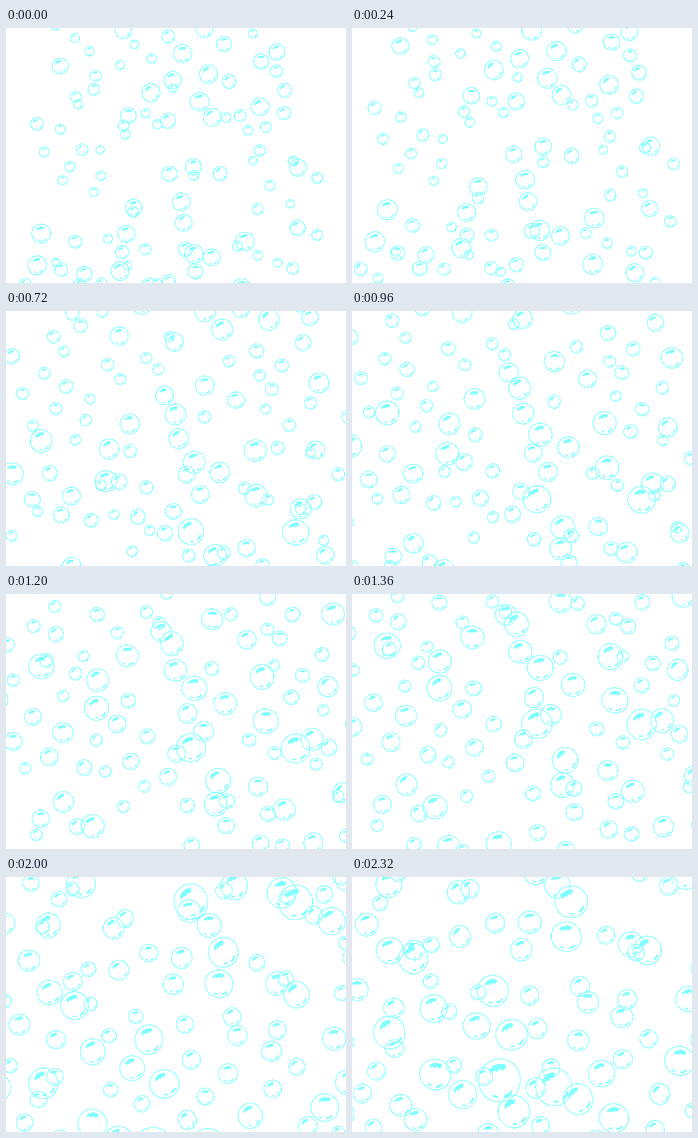
Write an HTML page that moves like this. It is 500x375 px and loops after 2400 ms.

```html
<!DOCTYPE html>
<html lang="en">
<head>
<meta charset="utf-8">
<title>Rising bubbles</title>
<style>
html, body { margin: 0; width: 100%; height: 100%; overflow: hidden; background: #fff; }
svg { display: block; width: 100vw; height: 100vh; }
.rim { fill: none; stroke: #80ffff; stroke-width: 1.2; vector-effect: non-scaling-stroke; }
.shine { fill: #80ffff; }
</style>
</head>
<body>
<svg id="stage" viewBox="0 0 500 375" shape-rendering="crispEdges"></svg>
<script>
const WIDTH = 500, HEIGHT = 375;
const LOOP = 2400, STEP = 80;
const ANCHOR = 1360;    // moment, in ms, that the bubble positions describe
const GROWTH = 0.00023; // relative growth per ms
const RISE = 0.0102;    // rise per ms, in radii
const SPREAD = 0.0002;  // outward drift per ms, relative to the middle
const COUNT = 160;
const GOLDEN = 0.618034;

const scaleAt = time => Math.exp(GROWTH * (time - ANCHOR));
const travelAt = time => RISE * (scaleAt(time) - 1) / GROWTH; // in radii

let seed = 41;
const random = () => (seed = seed * 16807 % 2147483647) / 2147483647;
const between = (low, high) => low + (high - low) * random();

// The largest bubbles rise almost straight up: x, y, radius
const leaders = [
  [217, 573, 25], [297, 550, 22], [55, 437, 19],
  [272, 191, 22], [426, 192, 22], [52, 76, 19]
].map(([x, y, r]) => ({ x, y, r, drift: 0 }));

// Spread evenly over every height that comes into view during the loop
function follower(_, i) {
  const r = 8.5 + 10.5 * random() ** 1.25;
  const top = r * travelAt(0) - r / 2;
  const bottom = HEIGHT + r * travelAt(LOOP) + r / 2;
  const y = top + (bottom - top) * (i + random()) / COUNT;
  const half = Math.min(300, 265 + y * 0.15);
  const side = half * (2 * (i * GOLDEN % 1) - 1) + between(-20, 20);
  return { x: WIDTH / 2 + side, y, r, drift: side * SPREAD + between(-0.012, 0.012) };
}

const SHAPE = `
  <path class="rim" d="M0-1C.56-1 .99-.57 .99-.01S.57 1 .01 1-1 .56-1 0-.55-1 0-1Z"/>
  <path class="shine" d="M-.6-.36C-.5-.62-.24-.8 .08-.78L.16-.66 .04-.46-.12-.5-.22-.35-.37-.38-.52-.22Z"/>
  <path class="shine" d="M.36 .64Q.56 .53 .66 .32L.74 .4Q.66 .61 .45 .74Z"/>
  <path class="shine" d="M-.14 .71L.14 .73 .11 .82-.13 .81Z"/>`;

const stage = document.getElementById('stage');

function addBubble(bubble) {
  const node = document.createElementNS('http://www.w3.org/2000/svg', 'g');
  node.innerHTML = SHAPE;
  stage.append(node);
  return { ...bubble, node, tilt: between(-12, 22), phase: between(0, 2 * Math.PI) };
}

const bubbles = [...leaders, ...Array.from({ length: COUNT }, follower)].map(addBubble);

function draw(time) {
  const scale = scaleAt(time), travel = travelAt(time);
  for (const b of bubbles) {
    const x = b.x + b.drift * (time - ANCHOR);
    const y = b.y - b.r * travel;
    const r = b.r * scale;
    const wobble = Math.sin(time / 260 + b.phase);
    const wide = r * (1 + 0.025 * wobble), tall = r * (1 - 0.025 * wobble);
    b.node.setAttribute('transform',
      `translate(${x} ${y}) rotate(${b.tilt + 6 * wobble}) scale(${wide} ${tall})`);
  }
}

function tick() {
  const time = performance.now() % LOOP;
  draw(Math.floor(time / STEP) * STEP);
  requestAnimationFrame(tick);
}
tick();
</script>
</body>
</html>
```
